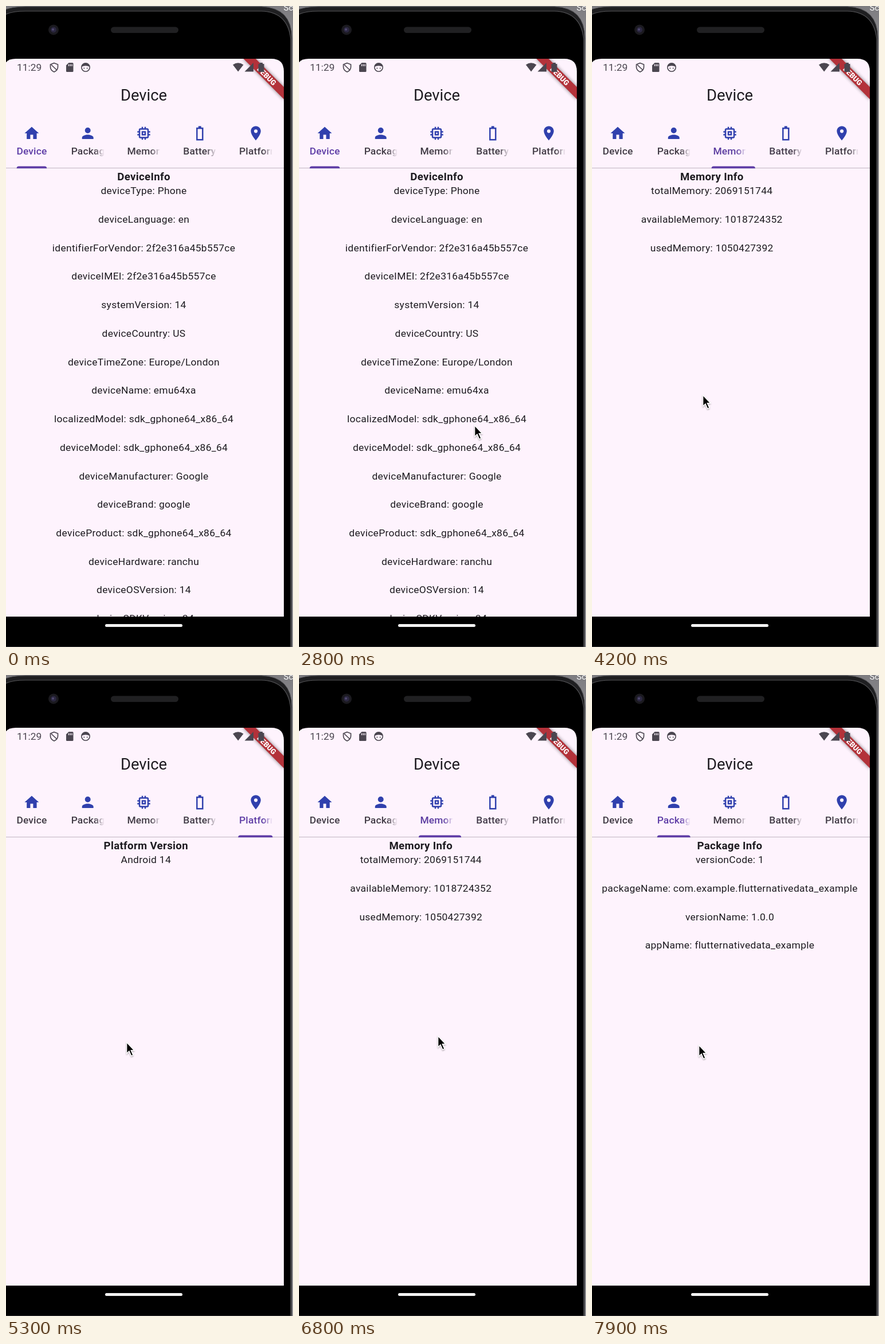
Write an HTML page that moves like this. It is 501x1118 px and loops after 8 s.

```html
<!DOCTYPE html>
<html lang="en">
<head>
<meta charset="utf-8">
<title>Device info</title>
<style>
html, body { margin: 0; width: 100%; height: 100%; overflow: hidden; background: #000; }
svg { display: block; width: 501px; height: 1118px; }
text { font-family: Roboto, sans-serif; font-size: 17.42px; }
.row { fill: #1d1b20; letter-spacing: .311px; text-anchor: middle; }
.head { font-size: 18.66px; font-weight: 700; }
.tab { font-weight: 500; letter-spacing: .124px; }
.icon { fill: #3040ad; fill-rule: evenodd; }
.sys { fill: #4b4650; }
</style>
</head>
<body>
<svg viewBox="0 0 501 1118" xmlns="http://www.w3.org/2000/svg">
  <defs>
    <clipPath id="screen"><path d="M-4 1065V112Q-4 92 17 92H463Q485 92 485 114V1065Z"/></clipPath>
    <clipPath id="view"><rect y="284" width="485" height="781"/></clipPath>
    <linearGradient id="fade">
      <stop offset=".7" stop-color="#fff"/><stop offset="1" stop-color="#fff" stop-opacity="0"/>
    </linearGradient>
    <linearGradient id="desk" x2="0" y2="1">
      <stop stop-color="#7d7c80"/><stop offset=".1" stop-color="#9a999b"/>
    </linearGradient>
    <mask id="cut" maskUnits="userSpaceOnUse" x="-29" y="235" width="58" height="36">
      <rect x="-29" y="235" width="58" height="36" fill="url(#fade)"/>
    </mask>
    <filter id="soft" x="-20%" y="-100%" width="140%" height="300%"><feGaussianBlur stdDeviation="3"/></filter>
    <filter id="drop" x="-50%" y="-30%" width="200%" height="180%">
      <feDropShadow dx="0" dy="1.5" stdDeviation="1.2" flood-opacity=".35"/>
    </filter>
  </defs>

  <!-- phone body -->
  <rect width="501" height="1118" fill="url(#desk)"/>
  <text x="484.500" y="8" fill="#fff" style="font-size:15px">Sc</text>
  <path d="M-5 1118V8Q8 1 34 1H446Q499 3 499 56V1118Z" fill="#1f1f21" stroke="#5d5d60"/>
  <path d="M-5 1118V17Q8 9 34 9H446Q492 10 497 58V1118Z" fill="#000" stroke="#555558" stroke-width="1.200"/>
  <circle cx="83" cy="41.500" r="9" fill="#1b1a1f"/>
  <circle cx="83" cy="41.500" r="5" fill="#2b2740"/>
  <circle cx="82" cy="41" r="2" fill="#514a70"/>
  <rect x="183" y="36.500" width="118" height="10.500" rx="5.200" fill="#202022"/>
  <rect x="173" y="1078" width="135" height="5" rx="2.500" fill="#f2f2f2"/>

  <g clip-path="url(#screen)">
    <rect x="-4" y="92" width="489" height="974" fill="#fef3fd"/>

    <text x="240.500" y="165" text-anchor="middle" fill="#1d1b20" style="font-size:27.4px">Device</text>

    <g id="tabs"></g>
    <rect y="282" width="485" height="1.200" fill="#c8bdc9"/>
    <path id="bar" fill="#5e3da6"/>

    <g clip-path="url(#view)"><g id="pages"></g></g>

    <!-- corner banner -->
    <g transform="translate(485 92) rotate(45)">
      <rect x="-49.800" y="34.800" width="99.600" height="15" opacity=".5" filter="url(#soft)"/>
      <rect x="-49.800" y="34.800" width="99.600" height="15" fill="#b3323a"/>
      <text y="46.800" text-anchor="middle" fill="#fff" style="font-size:12.690px;font-weight:900">DEBUG</text>
    </g>

    <!-- status bar -->
    <g class="sys">
      <text x="19" y="113.300">11:29</text>
      <path d="M84 99.500L90.500 102V106.500Q90.500 112 84 115Q77.500 112 77.500 106.500V102Z" fill="none" stroke="#4b4650" stroke-width="1.700"/>
      <path d="M79 102.500L89 112" stroke="#4b4650" stroke-width="1.700"/>
      <path d="M109.500 99H116Q117.500 99 117.500 100.500V113.500Q117.500 115 116 115H106.500Q105 115 105 113.500V103.500Z"/>
      <path d="M109.500 101.500V105M112.300 101.500V105M115 101.500V105" stroke="#fef3fd" stroke-width="1.300"/>
      <circle cx="139" cy="107" r="7.200" fill="none" stroke="#4b4650" stroke-width="1.600"/>
      <path d="M132 106Q133 99.500 139 99.500T146 106Q139 102.500 132 106Z"/>
      <circle cx="136.300" cy="108.500" r="1"/><circle cx="141.700" cy="108.500" r="1"/>
      <path d="M396 102.500Q405 96 414.500 102.500L405.200 114.500Z"/>
      <path d="M416.500 114.500L432 99V114.500Z"/>
      <path d="M443 99H448V101H450.500V115H440.500V101H443Z"/>
    </g>
  </g>

  <path id="cursor" d="M.700 .700V20L5 15.900L8.700 24.300L11.900 22.900L8.200 14.700H13.800Z" fill="#000" stroke="#fff" stroke-width="1.300" filter="url(#drop)"/>
</svg>

<script>
const LOOP = 8000, PAGE = 489, MID = 240.5, PITCH = 97.8, LINE = 24.87;
const $ = id => document.getElementById(id);

function add(parent, tag, attrs, text) {
  const el = document.createElementNS('http://www.w3.org/2000/svg', tag);
  for (const k in attrs) el.setAttribute(k, attrs[k]);
  if (text) el.textContent = text;
  return parent.appendChild(el);
}

const tabs = [
  ['Device', 'M10 20v-6h4v6h5v-8h3L12 3 2 12h3v8z'],
  ['Package', 'M12 12a4 4 0 1 0 0-8 4 4 0 0 0 0 8zm0 2c-2.67 0-8 1.34-8 4v2h16v-2c0-2.66-5.33-4-8-4z'],
  ['Memory', 'M15 9H9v6h6V9zm-2 4h-2v-2h2v2zm8-2V9h-2V7c0-1.1-.9-2-2-2h-2V3h-2v2h-2V3H9v2H7c-1.1 0-2 .9-2 2v2H3v2h2v2H3v2h2v2c0 1.1.9 2 2 2h2v2h2v-2h2v2h2v-2h2c1.1 0 2-.9 2-2v-2h2v-2h-2v-2h2zm-4 6H7V7h10v10z'],
  ['Battery', 'M17 4h-3V2h-4v2H7v18h10V4zM15 20H9V6h6v14z'],
  ['Platform', 'M12 2C8.13 2 5 5.13 5 9c0 5.25 7 13 7 13s7-7.75 7-13c0-3.87-3.13-7-7-7zm0 9.5a2.5 2.5 0 1 1 0-5 2.5 2.5 0 0 1 0 5z']
];

const pages = [
  ['DeviceInfo', 'deviceType: Phone', 'deviceLanguage: en', 'identifierForVendor: 2f2e316a45b557ce',
    'deviceIMEI: 2f2e316a45b557ce', 'systemVersion: 14', 'deviceCountry: US',
    'deviceTimeZone: Europe/London', 'deviceName: emu64xa', 'localizedModel: sdk_gphone64_x86_64',
    'deviceModel: sdk_gphone64_x86_64', 'deviceManufacturer: Google', 'deviceBrand: google',
    'deviceProduct: sdk_gphone64_x86_64', 'deviceHardware: ranchu', 'deviceOSVersion: 14',
    'deviceSDKVersion: 34'],
  ['Package Info', 'versionCode: 1', 'packageName: com.example.flutternativedata_example',
    'versionName: 1.0.0', 'appName: flutternativedata_example'],
  ['Memory Info', 'totalMemory: 2069151744', 'availableMemory: 1018724352', 'usedMemory: 1050427392'],
  ['Battery Info', 'batteryLevel: 100'],
  ['Platform Version', 'Android 14']
];

const labels = tabs.map(([name, icon], i) => {
  const g = add($('tabs'), 'g', { transform: `translate(${MID + PITCH * (i - 2)} 0)` });
  add(g, 'path', { class: 'icon', d: icon, transform: 'translate(0 222) scale(1.244) translate(-12 -12)' });
  const holder = add(g, 'g', i ? { mask: 'url(#cut)' } : {});
  return add(holder, 'text', { class: 'tab', x: i ? -29 : 0, y: 258.8, 'text-anchor': i ? 'start' : 'middle' }, name);
});

pages.forEach((rows, i) => rows.forEach((row, n) => add($('pages'), 'text', {
  class: n ? 'row' : 'row head',
  x: MID + PAGE * i,
  y: n ? 328.1 + (n - 1) * 2 * LINE : 303.5
}, row)));

// Swipes: start, duration, page from, page to. A later one takes over.
const swipes = [
  [2850, 740, 0, 1], [3650, 500, 1, 2], [4153, 598, 2, 3], [4800, 648, 3, 4],
  [5650, 650, 4, 3], [6400, 647, 3, 2], [6830, 720, 2.045, 1]
];

// Pointer: time, x, y
const track = [
  [1600, 520, 900], [2300, 330, 770], [2700, 306, 731], [2850, 306, 731], [3050, 222, 708],
  [3400, 225, 697], [3650, 225, 697], [3820, 145, 690], [4140, 225, 679], [4200, 193, 678],
  [4340, 118, 668], [4780, 285, 655], [5000, 205, 642], [5300, 210, 640], [5650, 205, 638],
  [5850, 292, 634], [6380, 165, 630], [6620, 242, 629], [6830, 242, 629], [7030, 320, 638],
  [7500, 195, 645], [7800, 186, 645]
];

const smooth = x => x * x * (3 - 2 * x);
const unit = x => Math.max(0, Math.min(1, x));
const mix = (a, b, k) => a + (b - a) * k;

function pageAt(t) {
  const s = swipes.filter(w => w[0] <= t).pop();
  if (!s) return 0;
  const rest = 1 - unit((t - s[0]) / s[1]);
  return mix(s[2], s[3], smooth(1 - rest * rest));
}

function pointerAt(t) {
  const n = track.findIndex(k => k[0] > t);
  if (n < 0) return track[track.length - 1].slice(1);
  if (n === 0) return null;
  const a = track[n - 1], b = track[n], k = smooth((t - a[0]) / (b[0] - a[0]));
  return [mix(a[1], b[1], k), mix(a[2], b[2], k)];
}

function draw(t) {
  const p = pageAt(t);
  $('pages').setAttribute('transform', `translate(${-p * PAGE} 0)`);

  labels.forEach((el, i) => {
    const on = unit(1 - Math.abs(p - i));
    const rgb = [[65, 94], [59, 61], [69, 166]].map(([a, b]) => Math.round(mix(a, b, on)));
    el.setAttribute('fill', `rgb(${rgb})`);
  });

  // The bar stretches half way between two tabs.
  const half = mix(26.3, 29, unit(p)) + 46 * Math.sin(Math.PI * (p % 1));
  const x = MID + PITCH * (p - 2);
  $('bar').setAttribute('d', `M${x - half} 283.2q0-3.700 3.700-3.700H${x + half - 3.7}q3.700 0 3.700 3.700z`);

  const at = pointerAt(t);
  $('cursor').setAttribute('visibility', at ? 'visible' : 'hidden');
  if (at) $('cursor').setAttribute('transform', `translate(${at})`);
}

function tick() {
  draw(performance.now() % LOOP);
  requestAnimationFrame(tick);
}
tick();
</script>
</body>
</html>
```
